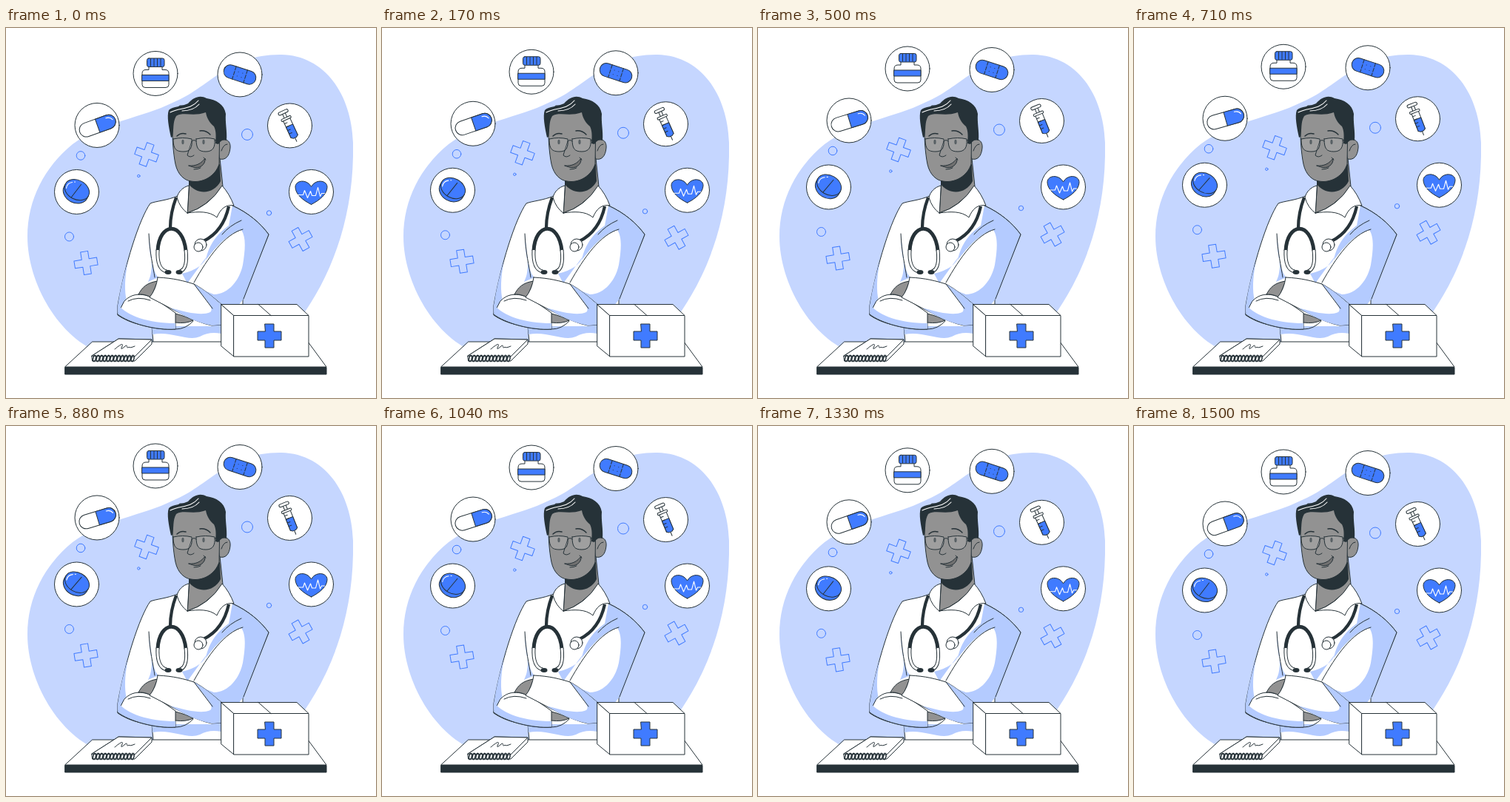
Write an HTML page that moves like this. It is 500 px wide and 500 px high and loops after 1.54 s.

```html
<!DOCTYPE html>
<html lang="en">
<head>
<meta charset="utf-8">
<title>Doctor</title>
<style>
html, body { margin: 0; width: 100%; height: 100%; overflow: hidden; background: #fff; }
svg { display: block; width: 100vw; height: 100vh; stroke-linecap: round; stroke-linejoin: round; }
.ink { stroke: #263238; stroke-width: 1; }
.line { fill: none; }
.bold { stroke-width: 1.5; }
.white { fill: #fff; }
.blue { fill: #407bff; }
.pale { fill: #c5d6ff; }
.shade { fill: #b4cbff; }
.skin { fill: #929292; }
.dark { fill: #263238; }
.shine { fill: none; stroke: #fff; stroke-width: 1.1; }
.outline { fill: none; stroke: #407bff; stroke-width: 1; }
.tube { fill: none; stroke: #263238; stroke-width: 4.2; stroke-linecap: butt; }
</style>
</head>
<body>
<svg viewBox="0 0 500 500">
  <defs>
    <path id="plus" d="M-5-15.5H5V-5H15.5V5H5V15.5H-5V5H-15.5V-5H-5Z"/>
    <circle id="disc" r="30" class="white ink"/>
  </defs>

  <path class="pale" d="M372 36C431 37 467 90 469 155C471 250 443 326 405 382C390 408 380 440 340 440H130C72 420 29 345 29 282C29 232 52 188 90 157C130 127 185 121 225 101C275 81 300 35 372 36Z"/>

  <g id="float">
    <g class="outline">
      <circle cx="101" cy="173" r="5.8"/>
      <circle cx="85.5" cy="282.5" r="6"/>
      <circle cx="326" cy="144.500" r="7.5"/>
      <circle cx="355.5" cy="250.500" r="3.2"/>
      <circle cx="179.3" cy="200.500" r="1.7"/>
      <use href="#plus" transform="translate(190 171.5) rotate(20)"/>
      <use href="#plus" transform="translate(108 318) rotate(-9)"/>
      <use href="#plus" transform="translate(398 286) rotate(-29)"/>
    </g>

    <g transform="translate(202 62)">
      <use href="#disc"/>
      <path class="white ink" d="M-9-10V-5H-13Q-18-5-18 0V15Q-18 19-14 19H14Q18 19 18 15V0Q18-5 13-5H9V-10Z"/>
      <path class="blue ink" d="M-18 2H18V10H-18Z"/>
      <rect class="blue ink" x="-11.5" y="-20.5" width="23.5" height="11.5" rx="2.5"/>
      <path class="line ink" d="M-6.5-20V-10M-2-20V-10M2.500-20V-10M7-20V-10"/>
    </g>

    <g transform="translate(316 63.5)">
      <use href="#disc"/>
      <g transform="rotate(18)">
        <rect class="blue ink" x="-22.500" y="-9" width="45" height="18" rx="9"/>
        <path class="line ink" stroke-dasharray="5 2" d="M-8-9V9M8-9V9"/>
        <path class="line ink" d="M-3-3h.1M3-3h.1M-3 3h.1M3 3h.1"/>
      </g>
    </g>

    <g transform="translate(123 132)">
      <use href="#disc"/>
      <g class="tilt">
        <g transform="translate(.7 .7) rotate(-20)">
          <rect class="white ink" x="-25.500" y="-9.500" width="51" height="19" rx="9.500"/>
          <path class="blue ink" d="M0-9.500H16A9.500 9.500 0 0 1 16 9.500H0Z"/>
          <path class="shine" d="M14-6Q20-6 22-1"/>
        </g>
      </g>
    </g>

    <g transform="translate(383.5 132.5)">
      <use href="#disc"/>
      <g class="tilt">
        <g transform="translate(-.5 0) rotate(-25)">
          <path class="line ink" d="M0 17V23.500"/>
          <path class="white ink" d="M-2-19H2V-8H-2Z"/>
          <rect class="white ink" x="-7" y="-22" width="14" height="4" rx="2"/>
          <path class="white ink" d="M-5-11H5V16H-5Z"/>
          <path class="blue ink" d="M-5 0H5V16L2 18H-2L-5 16Z"/>
          <rect class="white ink" x="-7" y="-12" width="14" height="3" rx="1"/>
          <path class="line ink" d="M-5-5H-1M-5 0H-1M-5 5H-1M-5 10H-1"/>
        </g>
      </g>
    </g>

    <g transform="translate(95.5 222)">
      <use href="#disc"/>
      <g class="tilt">
        <g transform="translate(-.5 -1) rotate(27)">
          <path class="blue ink" d="M-17.500-2V2A17.500 14 0 0 0 17.500 2V-2Z"/>
          <ellipse class="blue ink" cy="-2" rx="17.500" ry="13"/>
        </g>
        <path class="line ink" d="M-7 7L6-10"/>
        <path class="shine" d="M-14-5Q-13-12-6-13M-3-13.500h1"/>
      </g>
    </g>

    <g transform="translate(412.5 222)">
      <use href="#disc"/>
      <path class="blue ink" d="M0 17C-12 11-21 3-21.500-6C-22-16-6-18 0-7C6-18 22-16 21.500-6C21 3 12 11 0 17Z"/>
      <path class="shine" d="M-19 4H-11L-9-2L-5 8L-1-1L1 5H6L9-6L12 6L14 2H18"/>
    </g>
  </g>

  <!-- coat -->
  <path class="white ink" d="M232 227C218 233 202 234 195 237C180 258 160 322 151 375V388C164 397 181 402 197 403L199 425H320V365L355 279C344 264 328 250 306 240L292 216L246 250Z"/>
  <path class="shade" d="M197 403H291V413C280 411 271 412 262 417C245 424 224 409 198 414Z"/>
  <path class="shade" d="M165 315C160 338 160 355 163 369L151 386V375Q156 342 165 315Z"/>
  <path class="shade" d="M193 278C193 306 199 331 206 337L192 343C201 326 195 305 193 278ZM238 332Q266 325 271 309L245 345Z"/>
  <path class="shade" d="M306 240C328 250 344 264 355 279L321 366L291 404L276 402C290 397 295 387 282 376L250 348L281 360C301 360 316 340 320 320C323 301 325 283 318 273C301 277 283 296 270 314C274 291 288 276 301 267Z"/>
  <path class="line ink" d="M306 240C328 250 344 264 355 279L321 366M320 272C295 279 273 310 254 344M318 260Q302 267 292 279M193 278C194 304 199 322 201 337"/>

  <!-- lower arm and its hand -->
  <path class="skin ink" d="M229 386Q244 390 253 395Q243 400 229 398Z"/>
  <path class="white ink" d="M160 369C173 355 190 360 203 367L229 385V407C203 409 166 399 151 387Z"/>
  <path class="shade" d="M152 374C163 389 193 399 229 399V407C203 409 166 399 151 387Z"/>
  <path class="line ink" d="M165 369Q178 362 195 368M151 387C166 399 203 409 229 407Q243 407 253 396"/>

  <!-- upper arm and its hand -->
  <path class="skin ink" d="M179 360C184 350 191 344 205 342L196 364Q187 359 179 360Z"/>
  <path class="white ink" d="M205 337C227 338 241 342 254 346C269 354 281 365 293 375V401L278 402C253 397 224 379 194 364Q203 353 205 337Z"/>
  <path class="shade" d="M254 346C269 354 281 365 293 375V401L278 402C258 398 241 390 222 378C246 385 265 389 276 384C283 379 267 364 254 346Z"/>
  <path class="line ink" d="M254 346L279 379"/>

  <!-- neck and collar -->
  <path class="skin ink" d="M248 205L245 250Q270 243 293 214L289 176Z"/>
  <path class="dark" d="M247 202L289 184L290 207C281 225 258 226 247 211Z"/>
  <path class="white ink" d="M245 250Q275 241 292 213Q302 224 308 240C297 238 290 244 285 256C275 247 259 248 245 250Z"/>
  <path class="white ink" d="M247 213C239 215 233 221 231 229Q235 243 245 250Z"/>

  <!-- stethoscope -->
  <path class="tube" d="M230 229Q222 250 222 270M301 241C296 264 285 279 267 288"/>
  <path class="line ink" stroke-linecap="butt" style="stroke-width:5" d="M205 301C207 262 239 261 243 301"/>
  <g fill="none" stroke-linecap="butt">
    <path stroke="#263238" stroke-width="5" d="M205 300C204 318 208 327 217 329M243 300C245 318 242 327 235 329"/>
    <path stroke="#fff" stroke-width="3" d="M205 300C204 318 208 327 217 329M243 300C245 318 242 327 235 329"/>
  </g>
  <ellipse class="dark" cx="219" cy="330" rx="4.500" ry="3"/>
  <ellipse class="dark" cx="234" cy="330" rx="4.500" ry="3"/>
  <circle class="white ink" cx="263" cy="293" r="8"/>
  <circle class="white ink" cx="260" cy="296" r="6"/>

  <!-- head -->
  <path class="skin ink" d="M286 155C295 147 304 151 303 162C302 174 296 179 289 177Z"/>
  <path class="line ink" d="M291 166Q294 157 299 157"/>
  <path class="skin ink" d="M225 119C224 145 226 170 229 184C232 198 241 206 250 207C266 210 283 200 288 184L289 120L270 105H235Z"/>
  <path class="dark" d="M223 148C220 134 217 119 220 111C225 106 238 106 246 102C253 94 262 90 271 95C284 97 295 103 297 116C296 128 299 139 298 152Q292 149 287 157L283 156C284 146 284 139 281 133C275 128 271 121 270 114C254 120 239 113 230 119C225 127 227 138 225 147Z"/>
  <path class="shine" d="M222 114C235 107 249 111 260 98M238 112Q253 112 261 103"/>
  <g class="line ink">
    <path class="bold" d="M231 146Q236 141 243 143M262 139Q270 138 276 144"/>
    <path d="M251 153Q247 165 245 172Q249 176 254 172"/>
    <path d="M251 153Q254 150 257 153M282 152L290 150"/>
  </g>
  <g class="dark" fill-opacity=".75">
    <ellipse cx="239" cy="154" rx="1.600" ry="3.200"/>
    <ellipse cx="267" cy="154" rx="1.600" ry="3.200"/>
  </g>
  <g fill="#fff" fill-opacity=".12" class="ink">
    <path d="M226 150Q239 147 251 150C252 162 249 167 240 167C230 167 226 164 226 150Z"/>
    <path d="M257 150Q270 147 282 150C283 162 279 167 270 167C260 167 257 163 257 150Z"/>
  </g>
  <path class="ink" fill="#707070" d="M247 186C257 187 264 183 269 176C270 185 261 191 253 188Z"/>
  <path class="line ink" d="M267 175L270 178M254 191Q260 191 263 189"/>

  <!-- desk -->
  <path class="white ink" d="M117 424H408L433 458H80Z"/>
  <path class="dark ink" d="M80 458.500H433V468H80Z"/>

  <g class="white ink">
    <path d="M116 443L152 420L197 421V427L174 450H117Z"/>
    <path d="M116 443L152 420L197 421L174 444Z"/>
  </g>
  <path class="line ink" d="M147 434C154 428 159 425 157 430Q153 437 161 430C165 426 162 435 166 431Q167 433 174 430"/>
  <g id="spiral" class="line ink bold"></g>

  <g class="white ink">
    <path d="M291 373.500L308 388.500V444L291 430Z"/>
    <path d="M291 373.500H393L409 388.500H308Z"/>
    <path d="M308 388.500H409V444H308Z"/>
  </g>
  <path class="line ink" d="M341 373.500L358 388.500"/>
  <path class="blue ink" d="M350 400H362V410H372V422H362V432H350V422H340V410H350Z"/>
</svg>
<script>
const LOOP = 1540, LEAD = 40, RISE = 10, TILT = 4;
const float = document.getElementById('float');
const tilted = document.querySelectorAll('.tilt');

document.getElementById('spiral').innerHTML = Array.from({ length: 12 }, (_, i) => {
  const x = 119.5 + i * 4.7;
  return `<ellipse cx="${x}" cy="446.5" rx="1.8" ry="4.2" transform="rotate(12 ${x} 446.5)"/>`;
}).join('');

// Linear rise and fall; the loop opens slightly after the lowest point.
function draw(now) {
  const phase = (now + LEAD) % LOOP / LOOP;
  const lift = 1 - Math.abs(2 * phase - 1);
  float.setAttribute('transform', `translate(0 ${-RISE * lift})`);
  for (const icon of tilted) icon.setAttribute('transform', `rotate(${TILT * lift})`);
}

const start = performance.now();
function tick() {
  draw(performance.now() - start);
  requestAnimationFrame(tick);
}
tick();
</script>
</body>
</html>
```
